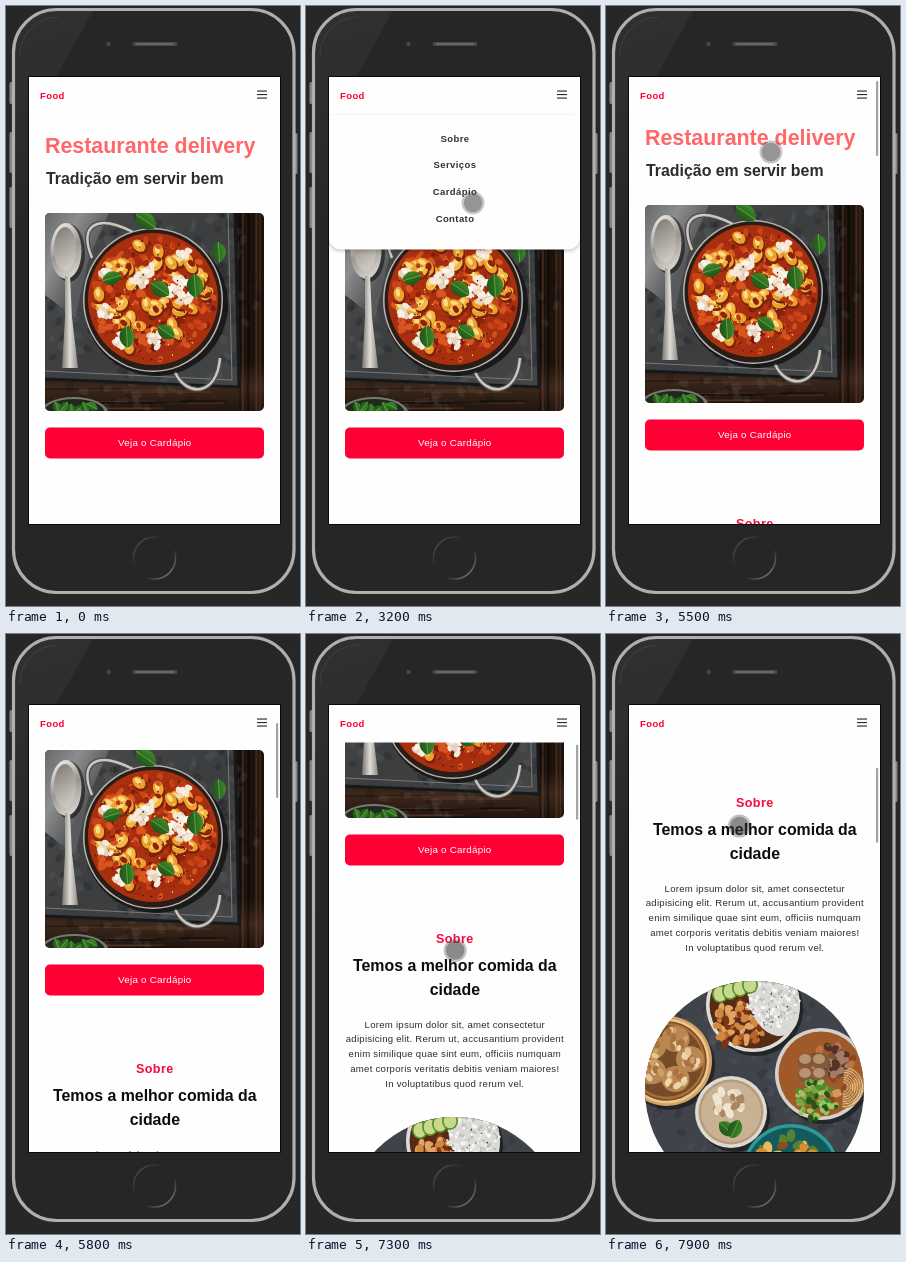
Recreate the animation shown at these times as an HTML page with a canvas. Size 294 by 600 pixels, loop 8 s.

```html
<!DOCTYPE html>
<html lang="pt-BR">
<head>
<meta charset="utf-8">
<title>Restaurante delivery</title>
<style>
  html, body { margin: 0; width: 100%; height: 100%; overflow: hidden; background: #272727; }
  canvas { display: block; width: 294px; height: 600px; }
</style>
</head>
<body>
<canvas id="stage" width="294" height="600"></canvas>
<script>
const LOOP = 8000, STEP = 100, TAU = Math.PI * 2;
const RED = '#ff0035', WHITE = '#fefefe', MID = 148.8;
const SCREEN = { x: 23, y: 71, w: 251, h: 447 };
const ctx = document.getElementById('stage').getContext('2d');

// Motion

const clamp = v => Math.min(1, Math.max(0, v));
const smooth = u => u * u * (3 - 2 * u);
const phase = (t, from, length) => clamp((t - from) / length);

const scrollAt = t => 174 * smooth(phase(t, 5400, 775)) + 0.2267 * Math.max(0, t - 7093);
const barAt = t => t < 7000 ? phase(t, 5400, 100) - phase(t, 6300, 400) : phase(t, 7000, 100);

function menuAt(t) {
  const away = (1 - phase(t, 1850, 370)) ** 3 + phase(t, 4300, 445) ** 2;
  return 108.5 - 485 * away;
}

// Pointer key points: time, x, y
const PATH = [[200, 56, 64], [600, 110, 228], [1000, 239, 115], [1500, 256.5, 93.5],
  [2600, 256.5, 93.5], [3000, 107, 262], [3500, 257, 99], [4000, 258, 87], [4600, 258, 87],
  [5300, 166, 240], [5700, 164, 52], [6000, 164, 52], [6200, 165.5, 88.5], [6300, 165.5, 88.5],
  [6800, 150, 372], [7100, 150, 372], [7600, 148, 233], [7900, 133.5, 192]];

function pointerAt(t) {
  const k = PATH.findIndex(p => p[0] >= t);
  if (k < 1) return PATH[k < 0 ? PATH.length - 1 : 0].slice(1);
  const [t0, x0, y0] = PATH[k - 1], [t1, x1, y1] = PATH[k];
  const u = (t - t0) / (t1 - t0);
  return [x0 + (x1 - x0) * u, y0 + (y1 - y0) * u];
}

// Drawing helpers

function seeded(seed) {
  return () => (seed = (seed * 16807) % 2147483647) / 2147483647;
}

function box(c, x, y, w, h, r, fill) {
  c.beginPath();
  c.roundRect(x, y, w, h, r);
  if (fill) { c.fillStyle = fill; c.fill(); }
}

function oval(c, x, y, rx, ry, fill, turn = 0) {
  c.beginPath();
  c.ellipse(x, y, rx, ry, turn, 0, TAU);
  c.fillStyle = fill;
  c.fill();
}

function line(c, color, width, trace) {
  c.beginPath();
  trace();
  c.strokeStyle = color;
  c.lineWidth = width;
  c.stroke();
}

function poly(c, points, fill) {
  c.beginPath();
  points.forEach(([x, y]) => c.lineTo(x, y));
  c.closePath();
  c.fillStyle = fill;
  c.fill();
}

function fade(c, x0, y0, x1, y1, ...colors) {
  const g = c.createLinearGradient(x0, y0, x1, y1);
  colors.forEach((color, i) => g.addColorStop(i / (colors.length - 1), color));
  return g;
}

function text(str, x, y, size, color, { weight = '', align = 'center', gap = 0 } = {}) {
  ctx.font = `${weight} ${size}px "Liberation Sans", Arial, sans-serif`;
  ctx.letterSpacing = gap + 'px';
  ctx.textAlign = align;
  ctx.fillStyle = color;
  ctx.fillText(str, x, y);
}

function photo(w, h, paint) {
  const cv = document.createElement('canvas');
  cv.width = w;
  cv.height = h;
  paint(cv.getContext('2d'));
  return cv;
}

// Calls put(x, y, random) for n spots on a disc
function scatter(rnd, n, x, y, spread, put) {
  for (let i = 0; i < n; i++) {
    const a = rnd() * TAU, d = Math.sqrt(rnd()) * spread;
    put(x + Math.cos(a) * d, y + Math.sin(a) * d, rnd());
  }
}

function strew(c, rnd, n, x, y, spread, size, colors) {
  scatter(rnd, n, x, y, spread, (px, py, r) => {
    const s = size * (0.7 + r * 0.5);
    oval(c, px, py, s, s * 0.68, colors[Math.floor(rnd() * colors.length)], rnd() * 3);
  });
}

function leaf(c, x, y, len, turn) {
  c.save();
  c.translate(x, y);
  c.rotate(turn);
  c.beginPath();
  c.moveTo(-len, 0);
  c.bezierCurveTo(-len * 0.5, -len, len * 0.6, -len * 0.8, len, 0);
  c.bezierCurveTo(len * 0.6, len * 0.8, -len * 0.5, len, -len, 0);
  c.fillStyle = fade(c, 0, -len, 0, len, '#4c9c2d', '#2b6b20', '#1c4c16');
  c.fill();
  line(c, '#79b552', 0.7, () => { c.moveTo(-len, 0); c.lineTo(len, 0); });
  c.restore();
}

// Pictures

const panPhoto = photo(219, 198, c => {
  const rnd = seeded(77);
  box(c, 0, 0, 219, 198, 5);
  c.clip();
  c.fillStyle = fade(c, 0, 150, 0, 198, '#1c120d', '#3c281c', '#21150e');
  c.fillRect(0, 0, 219, 198);
  for (let i = 0; i < 14; i++) {
    c.fillStyle = i % 2 ? 'rgba(125,82,54,.3)' : 'rgba(0,0,0,.35)';
    c.fillRect(rnd() * 110, 172 + rnd() * 26, 60 + rnd() * 90, 1.5);
    c.fillRect(194 + rnd() * 25, 0, 1.5, 198);
  }
  // tray and cloth
  poly(c, [[0, 0], [190, 0], [194, 174], [0, 166]], fade(c, 0, 0, 190, 170, '#4c4e50', '#3b3d3f', '#434547'));
  strew(c, rnd, 280, 95, 80, 120, 5, ['rgba(10,11,13,.2)', 'rgba(150,153,156,.1)']);
  line(c, '#17181a', 3, () => { c.moveTo(0, 166); c.lineTo(194, 174); c.lineTo(190, 0); });
  line(c, '#77797a', 1, () => { c.moveTo(0, 158); c.lineTo(187, 167); c.lineTo(183, 0); });
  poly(c, [[0, 0], [64, 0], [44, 45], [30, 105], [0, 82]], fade(c, 0, 0, 55, 30, '#68696b', '#8c8d8e', '#58595b'));
  // spoon
  const steel = fade(c, 6, 15, 36, 60, '#f0ece6', '#99958f', '#ddd8d1');
  oval(c, 24, 40, 16, 29, 'rgba(0,0,0,.5)');
  oval(c, 21, 38, 15.5, 28, steel);
  oval(c, 20, 36, 11, 22, fade(c, 9, 20, 32, 55, '#86817a', '#d6d1ca'));
  poly(c, [[20, 63], [25, 63], [27, 104], [33, 155], [17, 155], [20, 104]],
    fade(c, 17, 0, 33, 0, '#77736e', '#e0dcd6', '#8d8883'));
  // pan
  for (const [color, width] of [['#4e4c49', 5], ['#cbc8c2', 2.5]]) {
    line(c, color, width, () => {
      c.moveTo(47, 45);
      c.bezierCurveTo(34, 13, 50, 0, 88, 19);
      c.moveTo(130, 159);
      c.bezierCurveTo(141, 184, 172, 184, 175, 145);
    });
  }
  oval(c, 111, 91, 72, 72, 'rgba(0,0,0,.6)');
  oval(c, 108, 87, 70, 72, '#b9b5ae');
  oval(c, 108, 87, 68.5, 70.5, '#2a1c17');
  oval(c, 108, 86, 65, 66, '#a8300f');
  strew(c, rnd, 170, 108, 86, 60, 5, ['#c8431a', '#7e1f0e', '#d9541f', '#a32b10']);
  scatter(rnd, 44, 108, 86, 56, (x, y, r) => {
    const turn = r * 3;
    oval(c, x + 1, y + 2, 8, 6, '#7b210d', turn);
    oval(c, x, y, 7.5, 5.3, r < 0.5 ? '#eda02c' : '#f3b640', turn);
    oval(c, x - 1, y - 1.5, 4, 2.2, '#fbdc85', turn);
  });
  strew(c, rnd, 75, 108, 86, 61, 3.5, ['#bb3712', '#8e230d', '#d2511f']);
  scatter(rnd, 13, 108, 86, 56, (x, y) => strew(c, rnd, 9, x, y, 7, 4, ['#f4e9da', '#e6d3bb', '#fbf5ea']));
  strew(c, rnd, 110, 108, 86, 61, 0.9, ['#35120a', '#4b1a0d', '#f7d899']);
  [[67, 65], [115, 76], [150, 73], [121, 119], [82, 124], [101, 8], [174, 39]].forEach(([x, y], i) =>
    leaf(c, x, y, 10 + i % 3, (i * 0.9 - 0.3) % 1.8));
  oval(c, 29, 200, 34, 16, '#777b73');
  oval(c, 29, 200, 31, 14, '#20291b');
  for (let i = 0; i < 6; i++) leaf(c, 12 + i * 7, 193 + rnd() * 5, 6, rnd() * 3);
});

const bowlsPhoto = photo(219, 219, c => {
  const rnd = seeded(41);
  oval(c, 109.5, 109.5, 109.5, 109.5, '#41434b');
  c.clip();
  strew(c, rnd, 200, 109, 95, 110, 5, ['rgba(20,22,29,.17)', 'rgba(140,145,155,.09)']);
  const bowl = (x, y, r, rim, inside) => {
    oval(c, x + 3, y + 4, r, r, 'rgba(0,0,0,.45)');
    oval(c, x, y, r, r, rim);
    oval(c, x, y, r - 3.5, r - 3.5, inside);
  };
  // dumplings
  bowl(22, 80, 45, '#d4a266', '#754b28');
  for (const r of [41, 37]) line(c, r > 40 ? '#edc68c' : '#a96f36', 2.5, () => c.arc(22, 80, r, 0, TAU));
  for (let i = 0; i < 5; i++) {
    const x = 24 + Math.cos(i * TAU / 5) * 21, y = 78 + Math.sin(i * TAU / 5) * 21;
    oval(c, x, y, 14, 13, '#b98751');
    strew(c, rnd, 14, x, y, 10, 4, ['#e5c696', '#cf9f66', '#edd5ae', '#a9733f']);
  }
  // chicken and rice
  bowl(108, 24, 47, '#dedcd7', '#552b16');
  strew(c, rnd, 75, 94, 42, 25, 4.5, ['#b96229', '#d08742', '#7b3515', '#e0a564']);
  oval(c, 129, 22, 24, 34, '#d9d9d6', -0.35);
  strew(c, rnd, 170, 128, 20, 26, 2, ['#f8f7f4', '#e5e4df', '#bdbcb9']);
  strew(c, rnd, 14, 124, 28, 22, 0.9, ['#2a2421']);
  for (let i = 0; i < 4; i++) {
    oval(c, 75 + i * 10, 13 - i * 3, 8, 9, '#5a9231');
    oval(c, 75 + i * 10, 13 - i * 3, 6.3, 7.3, '#c7d98b');
  }
  // noodle soup
  bowl(176, 93, 46, '#d3d1cc', '#a05a2a');
  strew(c, rnd, 40, 185, 92, 30, 5, ['#bd753b', '#8d4520', '#d09a59']);
  for (let i = 0; i < 15; i++) {
    line(c, i % 2 ? '#e6c794' : '#b7803f', 1, () => c.arc(198, 106, 4 + i * 1.2, -1.5, 1.6));
  }
  strew(c, rnd, 50, 188, 80, 16, 4, ['#79503c', '#a77c66', '#533228']);
  for (let i = 0; i < 4; i++) {
    const x = 161 + i % 2 * 14, y = 80 + (i >> 1) * 14;
    oval(c, x, y, 8.5, 8, '#80593c');
    oval(c, x - 1, y - 2, 6, 5, '#b8936f');
  }
  strew(c, rnd, 75, 172, 119, 20, 3.5, ['#4d8b2b', '#75aa42', '#24561a', '#97c662']);
  // cream soup
  bowl(86, 131, 36, '#dfdad0', '#b59c7e');
  oval(c, 86, 131, 30, 30, '#c9b294');
  strew(c, rnd, 22, 84, 122, 14, 5, ['#e8d8bd', '#a98560', '#f1e5d0']);
  leaf(c, 82, 148, 10, 0.7);
  leaf(c, 90, 148, 10, 2);
  // teal bowl
  bowl(146, 192, 49, '#2c9a98', '#135a5d');
  strew(c, rnd, 60, 146, 190, 38, 6, ['#d78c34', '#edb862', '#8e4c22', '#588231']);
});

const phone = photo(294, 600, c => {
  c.fillStyle = '#272727';
  c.fillRect(0, 0, 294, 600);
  for (const [x, y, h] of [[3.5, 76, 22], [3.5, 126, 41], [3.5, 181, 41], [288, 127, 41]]) {
    box(c, x, y, 3.5, h, 1.5, '#858585');
  }
  box(c, 7.5, 3.5, 280.5, 583, 43, '#262626');
  c.save();
  c.clip();
  poly(c, [[8, 3], [88, 3], [50, 71], [23, 71], [23, 250], [8, 280]],
    fade(c, 10, 10, 70, 190, '#303030', '#2d2d2d', '#272727'));
  c.restore();
  line(c, '#afafaf', 3.2, () => c.roundRect(7.5, 3.5, 280.5, 583, 43));
  line(c, '#404040', 1, () => c.arc(52, 49, 38, Math.PI, Math.PI * 1.5));
  oval(c, 102.5, 38, 2.2, 2.2, '#484848');
  box(c, 126.5, 36, 45, 4, 2, '#494949');
  box(c, 130, 37, 38, 2, 1, '#666');
  line(c, fade(c, 132, 535, 165, 568, '#4a4a4a', '#272727', '#272727', '#707070'), 1.6,
    () => c.arc(148.5, 552, 21, 0, TAU));
  c.fillStyle = '#0a0a0a';
  c.fillRect(SCREEN.x - 1, SCREEN.y - 1, SCREEN.w + 2, SCREEN.h + 2);
});

// Page

const LOREM = ['Lorem ipsum dolor sit, amet consectetur',
  'adipisicing elit. Rerum ut, accusantium provident',
  'enim similique quae sint eum, officiis numquam',
  'amet corporis veritatis debitis veniam maiores!',
  'In voluptatibus quod rerum vel.'];
const BOLD = { weight: 'bold' };
const LABEL = { weight: 'bold', gap: 0.4 };
const BODY = { gap: 0.25 };

function page(scroll) {
  ctx.save();
  ctx.translate(0, -Math.round(scroll));
  text('Restaurante delivery', 39, 147, 21.4, '#ff6769', { ...BOLD, align: 'left' });
  text('Tradição em servir bem', 40, 178, 15.9, '#2c2c2c', { ...BOLD, align: 'left' });
  ctx.drawImage(panPhoto, 39, 207);
  box(ctx, 39, 421.5, 219, 31, 5, RED);
  text('Veja o Cardápio', MID, 440, 9.8, '#fff', BODY);
  text('Sobre', MID, 530, 12.6, '#f50a3c', LABEL);
  text('Temos a melhor comida da', MID, 558, 15.9, '#0c0c0c', BOLD);
  text('cidade', MID, 582, 15.9, '#0c0c0c', BOLD);
  LOREM.forEach((row, i) => text(row, MID, Math.round(614.6 + i * 14.8), 9.6, '#2c2c32', BODY));
  ctx.drawImage(bowlsPhoto, 39, 704);
  ctx.restore();
}

function header() {
  ctx.fillStyle = WHITE;
  ctx.fillRect(SCREEN.x, SCREEN.y, SCREEN.w, 37.5);
  text('Food', 34, 93, 9.5, RED, { ...LABEL, align: 'left' });
  ctx.fillStyle = '#262626';
  for (let i = 0; i < 3; i++) ctx.fillRect(251, 84.5 + i * 3.5, 10, 1.1);
}

function menu(top) {
  ctx.save();
  ctx.beginPath();
  ctx.rect(SCREEN.x, top, SCREEN.w, 145);
  ctx.clip();
  ctx.shadowColor = 'rgba(0,0,0,.28)';
  ctx.shadowBlur = 4;
  ctx.shadowOffsetY = 1;
  box(ctx, SCREEN.x, top, SCREEN.w, 135, [0, 0, 12, 12], WHITE);
  ctx.restore();
  ['Sobre', 'Serviços', 'Cardápio', 'Contato'].forEach((item, i) =>
    text(item, 149, Math.round(top + 27 + i * 26.9), 9.5, '#333', LABEL));
}

function pointer(x, y, down) {
  const shade = down ? 50 : 70;
  oval(ctx, x, y, 11.5, 11.5, `rgba(${shade},${shade},${shade},.3)`);
  oval(ctx, x, y, 9.3, 9.3, `rgba(${shade},${shade},${shade},.38)`);
}

function draw(t) {
  const scroll = scrollAt(t);
  const tapped = t === 1900 || (t >= 4400 && t < 4600);
  ctx.drawImage(phone, 0, 0);
  ctx.save();
  ctx.beginPath();
  ctx.rect(SCREEN.x, SCREEN.y, SCREEN.w, SCREEN.h);
  ctx.clip();
  ctx.fillStyle = WHITE;
  ctx.fillRect(SCREEN.x, SCREEN.y, SCREEN.w, SCREEN.h);
  page(scroll);
  header();
  menu(menuAt(tapped ? Math.min(t, 4400) : t)); // the menu waits for the finger to lift
  if (tapped) {
    ctx.fillStyle = '#a9dff0';
    ctx.fillRect(249, 79.5, 15, 21);
  }
  box(ctx, 270, 73.7 + scroll * 0.168, 2.2, 75, 1, `rgba(90,90,90,${0.55 * barAt(t)})`);
  if (t >= PATH[0][0]) pointer(...pointerAt(t), tapped || t > 7000);
  ctx.restore();
}

let start;
function tick(now) {
  start ??= now;
  const t = (now - start) % LOOP;
  draw(Math.floor((t + 4) / STEP) * STEP % LOOP);
  requestAnimationFrame(tick);
}
requestAnimationFrame(tick);
</script>
</body>
</html>
```
